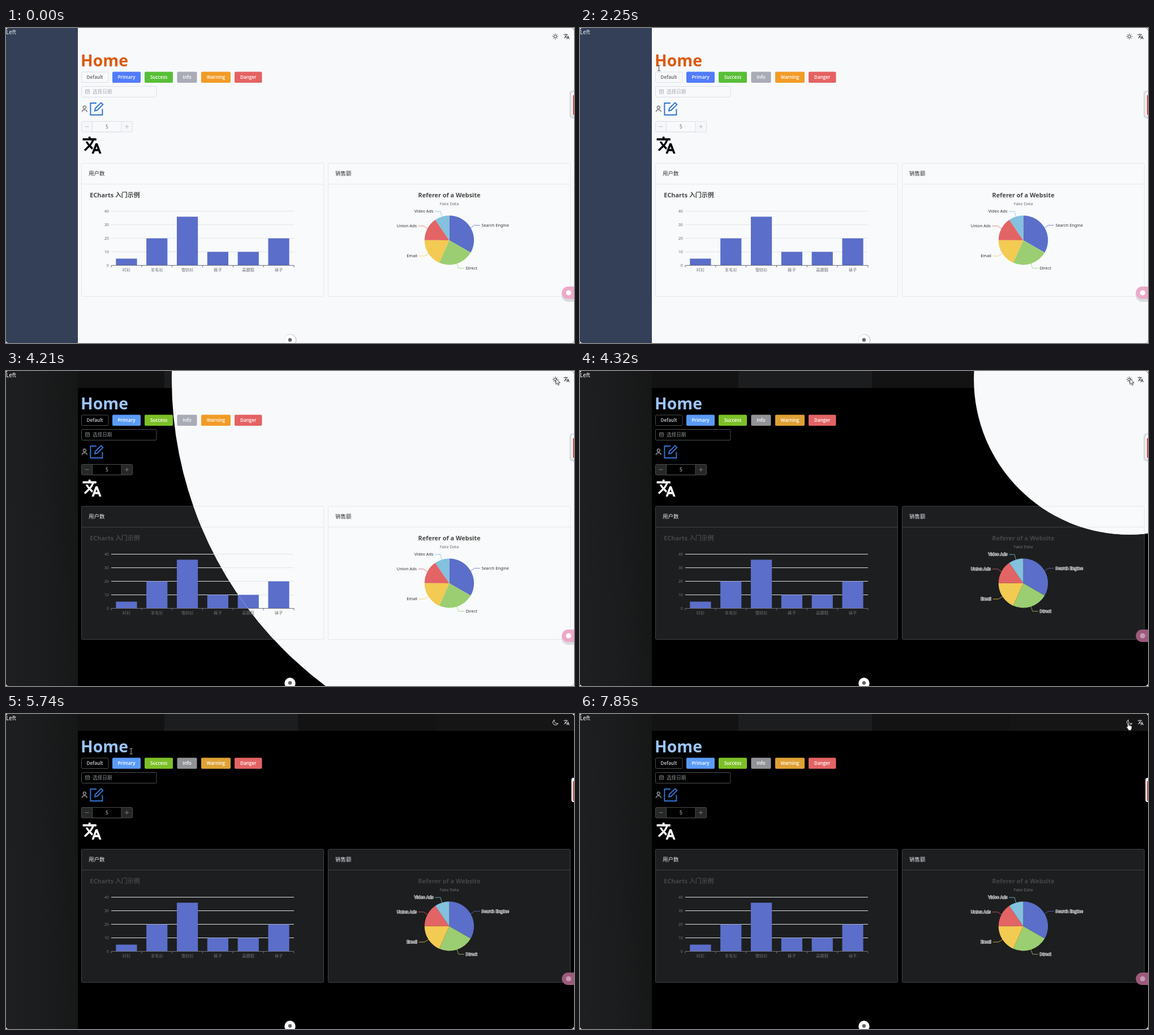
Recreate the animation shown at these times as an HTML page. Size 1004 by 558 pixels, loop 8000 ms.

```html
<!DOCTYPE html>
<html lang="zh-CN">
<head>
<meta charset="utf-8">
<title>Theme switch</title>
<style>
html, body { margin: 0; width: 100%; height: 100%; overflow: hidden; background: #fff; }
svg { position: absolute; left: 0; top: 0; width: 1004px; height: 558px; border-radius: 5px; overflow: hidden; }
text { font-family: "Noto Sans", "Noto Sans CJK SC", "Noto Sans CJK", sans-serif; }

.light {
  --bg: #f7f9fb; --side: #344058; --left: #e6eaf0; --home: #db5a0c;
  --line: #dcdfe6; --field: #f8f9fb; --step: #f5f7fa; --hint: #a8abb2; --text: #606266;
  --ink: #303133; --mark: #000; --edit: #3274d2;
  --card: #f8fafb; --edge: #e5e8ed; --grid: #e0e5ee; --halo: transparent; --label: #333;
  --primary: #517bfa; --success: #58bf38; --info: #a9abb6; --warning: #f29b27; --danger: #e56262;
  --pill: #eca9ca; --dot: #fff; --shade: #d9dbdf; --dark: 0; --lit: 1;
}
.dark {
  --bg: #000; --side: #1b1c1d; --left: #fff; --home: #9cc5fb;
  --line: #4c4d4f; --field: #000; --step: #262727; --hint: #8d9095; --text: #cfd3dc;
  --ink: #e5eaf3; --mark: #fff; --edit: #3274d2;
  --card: #1d1e1f; --edge: #414243; --grid: #dfe1e6; --halo: #e4e4e4; --label: #333;
  --primary: #5b9bf8; --success: #7cc027; --info: #929396; --warning: #dfa135; --danger: #e36464;
  --pill: #9c5a7c; --dot: #c59ab0; --shade: transparent; --dark: 1; --lit: 0;
}
.bg { fill: var(--bg); }
.side { fill: var(--side); }
.left { fill: var(--left); font-size: 10px; }
.home { fill: var(--home); font-size: 28.4px; font-weight: 700; }
.box { fill: var(--field); stroke: var(--line); }
.step { fill: var(--step); stroke: var(--line); }
.thin { fill: none; stroke: var(--hint); stroke-width: .8; }
.hint { fill: var(--hint); font-size: 8.6px; }
.value { fill: var(--text); font-size: 8.4px; }
.btn { font: 600 8.1px "Open Sans", "Noto Sans", sans-serif; fill: #fff; }
.btn.plain { fill: var(--text); }
.icon { fill: none; stroke: var(--ink); }
.mark { fill: var(--mark); stroke: var(--mark); stroke-width: .6; }
.mark.small { fill: var(--ink); stroke: var(--ink); stroke-width: .2; }
.edit { fill: none; stroke: var(--edit); stroke-width: 2; }
.card { fill: var(--card); stroke: var(--edge); }
.rule { stroke: var(--edge); }
.head { fill: var(--ink); font-size: 9.5px; }
.title { fill: #464646; font-size: 10.9px; font-weight: 700; }
.sub, .tick { fill: #6e7079; font-size: 7.3px; }
.grid { stroke: var(--grid); }
.axis { stroke: #6e7079; fill: none; }
.bar { fill: #5b6ec9; }
.name { fill: var(--label); stroke: var(--halo); stroke-width: 1.3; paint-order: stroke; font-size: 7.3px; }
.lead { fill: none; stroke-width: .8; }
.pill { fill: var(--pill); }
.dot { fill: var(--dot); }
.shade { fill: var(--shade); }
.on-dark { opacity: var(--dark); }
.on-light { opacity: var(--lit); }
.mid { text-anchor: middle; }
.end { text-anchor: end; }

.top { animation: shrink 8s infinite; }
@keyframes shrink {
  0% { clip-path: circle(1113px at 971px 15px); }
  49.8% { clip-path: circle(1113px at 971px 15px); animation-timing-function: ease-in; }
  54.8%, 100% { clip-path: circle(0px at 971px 15px); }
}
#pointer { animation: travel 8s linear infinite; }
@keyframes travel {
  0%, 4.375% { transform: translate(657px, 0px); }
  7% { transform: translate(376px, 56px); }
  11% { transform: translate(126px, 69px); }
  14.125%, 15.125% { transform: translate(146px, 71px); }
  16.75%, 18.5% { transform: translate(204px, 71px); }
  28.125%, 29.25% { transform: translate(139.5px, 71px); }
  33% { transform: translate(655px, 40px); }
  35.25%, 37.875% { transform: translate(932px, 7px); }
  40.25%, 45.6% { transform: translate(977px, 13.5px); }
  47.125%, 55.5% { transform: translate(972px, 13.5px); }
  58.25% { transform: translate(960px, 13.5px); }
  59.375% { transform: translate(746px, 58px); }
  62% { transform: translate(400px, 80px); }
  66% { transform: translate(90px, 120px); }
  69.875%, 70.5% { transform: translate(200px, 66px); }
  73% { transform: translate(242px, 66px); }
  77% { transform: translate(152px, 66px); }
  80.5%, 80.875% { transform: translate(200px, 66px); }
  83.5% { transform: translate(122px, 70px); }
  85.75% { transform: translate(202px, 70px); }
  87.875% { transform: translate(808px, 34px); }
  90.5% { transform: translate(1000px, 28px); }
  98.1%, 100% { transform: translate(969px, 16px); }
}
#arrow { animation: arrow 8s step-end infinite; }
#beam { animation: beam 8s step-end infinite; }
#hand { animation: hand 8s step-end infinite; }
@keyframes arrow {
  0%, 13%, 39%, 69%, 87.875%, 94%, 100% { opacity: 0; }
  4.375%, 29.3%, 49.8%, 86.5%, 90.5% { opacity: 1; }
}
@keyframes beam {
  0%, 29.3%, 86.5%, 100% { opacity: 0; stroke: #333; }
  13% { opacity: 1; stroke: #333; }
  69% { opacity: 1; stroke: #ccc; }
}
@keyframes hand {
  0%, 49.8% { opacity: 0; }
  39%, 94%, 100% { opacity: 1; }
}
</style>
</head>
<body>
<svg viewBox="0 0 1004 558">
  <defs>
    <linearGradient id="sideTone" x1="0" y1=".55" x2="1" y2=".45">
      <stop offset="0" stop-color="#1e1f20"/>
      <stop offset=".5" stop-color="#1b1c1d"/>
      <stop offset="1" stop-color="#161717"/>
    </linearGradient>
    <path id="translate" d="M12.87 15.07l-2.54-2.51.03-.03c1.74-1.94 2.98-4.17 3.71-6.53H17V4h-7V2H8v2H1v1.99h11.17C11.5 7.92 10.44 9.75 9 11.35 8.07 10.32 7.3 9.19 6.69 8h-2c.73 1.63 1.73 3.17 2.98 4.56l-5.09 5.02L4 19l5-5 3.11 3.11.76-2.04zM18.5 10h-2L12 22h2l1.12-3h4.75L21 22h2l-4.5-12zm-2.62 7l1.62-4.33L19.12 17h-3.24z"/>
    <g id="scene">
      <rect class="bg" width="1004" height="558"/>
      <rect class="side" width="127" height="558"/>
      <g class="on-dark">
        <rect width="127" height="558" fill="url(#sideTone)"/>
        <rect x="127" width="877" height="30" fill="#131313"/>
        <rect x="280" width="236" height="30" fill="#1c1d1f"/>
        <rect x="760" width="244" height="30" fill="#151515"/>
      </g>
      <text class="left" x="0" y="10.8">Left</text>

      <g class="on-light icon">
        <circle cx="971" cy="15" r="2.6"/>
        <path id="rays"/>
      </g>
      <path class="on-dark icon" d="M969.4 10.4A4.8 4.8 0 1 0 975.8 16.6A4.9 4.9 0 0 1 969.4 10.4Z"/>
      <use href="#translate" class="mark small" transform="translate(985.2 9.3) scale(.47)"/>

      <text class="home" x="132" y="67.8">Home</text>
      <g id="buttons"></g>

      <rect class="box" x="133.5" y="103.5" width="132.5" height="19" rx="2"/>
      <path class="thin" d="M140.5 109.5h7v6.6h-7zM140.5 111.7h7M142.4 108.5v1.6M145.6 108.5v1.6M142 113.8h4"/>
      <text class="hint" x="153" y="116">选择日期</text>

      <g class="icon">
        <circle cx="138.8" cy="140.6" r="2.6"/>
        <path d="M134.6 148.8v-1.2a2.6 2.6 0 0 1 2.6-2.6h3.2a2.6 2.6 0 0 1 2.6 2.6v1.2"/>
      </g>
      <path class="edit" d="M160 133h-10.6v21h21V143.5M157 146.7l.8-4.2 10.2-10.2 3.3 3.3-10.2 10.2z"/>

      <rect class="step" x="133.5" y="165.5" width="90" height="18.5" rx="2"/>
      <rect class="box" x="152.5" y="165.5" width="51.5" height="18.5"/>
      <path class="thin" d="M139.5 174.7h7M210.2 174.7h7M213.7 171.2v7"/>
      <text class="value mid" x="178.4" y="177.8">5</text>

      <use href="#translate" class="mark" transform="translate(134.5 190) scale(1.46)"/>

      <rect class="card" x="133.5" y="239.5" width="428" height="236" rx="2"/>
      <rect class="card" x="569.5" y="239.5" width="428" height="236" rx="2"/>
      <path class="rule" d="M134 276.5h427M570 276.5h427"/>
      <text class="head" x="146" y="261.2">用户数</text>
      <text class="head" x="582" y="261.2">销售额</text>

      <text class="title" x="148.3" y="300.2">ECharts 入门示例</text>
      <g id="bars"></g>
      <text class="title mid" x="783.6" y="300.2">Referer of a Website</text>
      <text class="sub mid" x="783.6" y="314">Fake Data</text>
      <g id="pie"></g>

      <rect class="shade" x="996" y="110.5" width="20" height="50" rx="6"/>
      <rect x="999.5" y="113" width="20" height="43" rx="4" fill="#fff"/>
      <rect x="1002" y="119" width="2" height="35" fill="#dd5752"/>
      <rect class="shade" x="982" y="460" width="40" height="25" rx="12"/>
      <rect class="pill" x="982.5" y="458" width="40" height="22" rx="11"/>
      <circle class="dot" cx="994.5" cy="469" r="4.6"/>
      <circle class="shade" cx="503" cy="553" r="11"/>
      <circle cx="502" cy="553" r="9.7" fill="#fff"/>
      <circle cx="502" cy="552.5" r="3.2" fill="#666"/>
    </g>
  </defs>
  <use href="#scene" class="dark"/>
</svg>
<svg class="top" viewBox="0 0 1004 558"><use href="#scene" class="light"/></svg>
<svg viewBox="0 0 1004 558">
  <g id="pointer">
    <path id="arrow" d="M0 0v10.2l2.4-2.2 1.6 3.7 1.7-.7-1.6-3.6h3.3z" fill="#fff" stroke="#111" stroke-width=".8"/>
    <path id="beam" d="M-2.3-4.8h1.7l.6.6.6-.6h1.7M0-4.2v8.4M-2.3 4.8h1.7l.6-.6.6.6h1.7" fill="none"/>
    <path id="hand" d="M-1.2.8a1.2 1.2 0 0 1 2.4 0v4l1.3-.4 1.3.5 1.3.1 1.4.8v3.4l-1.2 2.2v1.6h-5.2v-1.3l-3.2-4.2q-.5-1.5 1-1.2l.9.9z" fill="#fff" stroke="#111" stroke-width=".9"/>
  </g>
</svg>
<script>
const put = (id, html) => document.getElementById(id).innerHTML = html;
const polar = (deg, r, cx, cy) => {
  const a = deg * Math.PI / 180;
  return [cx + r * Math.sin(a), cy - r * Math.cos(a)].map(v => v.toFixed(2));
};

document.getElementById('rays').setAttribute('d', Array.from({ length: 8 }, (_, i) =>
  `M${polar(i * 45, 4, 971, 15)}L${polar(i * 45, 5.4, 971, 15)}`).join(''));

const buttons = [['Default', 133, 48], ['Primary', 188, 50], ['Success', 245, 50],
  ['Info', 302.5, 35], ['Warning', 345, 52], ['Danger', 404, 48.5]];
put('buttons', buttons.map(([label, x, w], i) => {
  const rect = i
    ? `<rect x="${x}" y="77.5" width="${w}" height="19.5" rx="2" style="fill:var(--${label.toLowerCase()})"/>`
    : `<rect class="box" x="133.5" y="78" width="47.5" height="18.5" rx="2"/>`;
  return rect + `<text class="btn mid${i ? '' : ' plain'}" x="${x + w / 2}" y="90.4">${label}</text>`;
}).join(''));

// Bar chart
const base = 420.5, unit = 2.395, x0 = 186, slot = 53.83;
const sales = [['衬衫', 5], ['羊毛衫', 20], ['雪纺衫', 36], ['裤子', 10], ['高跟鞋', 10], ['袜子', 20]];
let chart = '';
for (let v = 0; v <= 40; v += 10) {
  const y = base - v * unit;
  if (v) chart += `<path class="grid" d="M${x0} ${Math.floor(y) + .5}h323"/>`;
  chart += `<text class="tick end" x="182" y="${y + 2.3}">${v}</text>`;
}
sales.forEach(([name, v], i) => {
  const mid = x0 + slot * (i + .5);
  chart += `<rect class="bar" x="${mid - 18.6}" y="${base - v * unit}" width="37.2" height="${v * unit}"/>
    <text class="tick mid" x="${mid}" y="431">${name}</text>`;
});
chart += `<path class="axis" d="M${x0} ${base}h323${sales.concat([0]).map((_, i) =>
  `M${x0 + slot * i} ${base}v3.5`).join('')}"/>`;
put('bars', chart);

// Pie chart: name, value, colour, elbow x, label y
const slices = [['Search Engine', 1048, '#5b6ec9', 828, 349.4], ['Direct', 735, '#9bce72', 800, 425.6],
  ['Email', 580, '#f3ca52', 739.5, 404], ['Union Ads', 484, '#e36464', 738.5, 350.8],
  ['Video Ads', 300, '#83c1de', 768, 325]];
const total = slices.reduce((sum, s) => sum + s[1], 0);
const cx = 783.5, cy = 375.9, r = 43.7;
let from = 0;
put('pie', slices.map(([name, value, color, ex, ly]) => {
  const to = from + value / total * 360, mid = (from + to) / 2, dir = mid < 180 ? 1 : -1;
  const html = `<path fill="${color}" d="M${cx} ${cy}L${polar(from, r, cx, cy)}A${r} ${r} 0 0 1 ${polar(to, r, cx, cy)}Z"/>
    <path class="lead" stroke="${color}" d="M${polar(mid, r, cx, cy)}L${ex} ${ly}h${dir * 9.8}"/>
    <text class="name${dir < 0 ? ' end' : ''}" x="${ex + dir * 12.5}" y="${ly + 2.3}">${name}</text>`;
  from = to;
  return html;
}).join(''));
</script>
</body>
</html>
```
